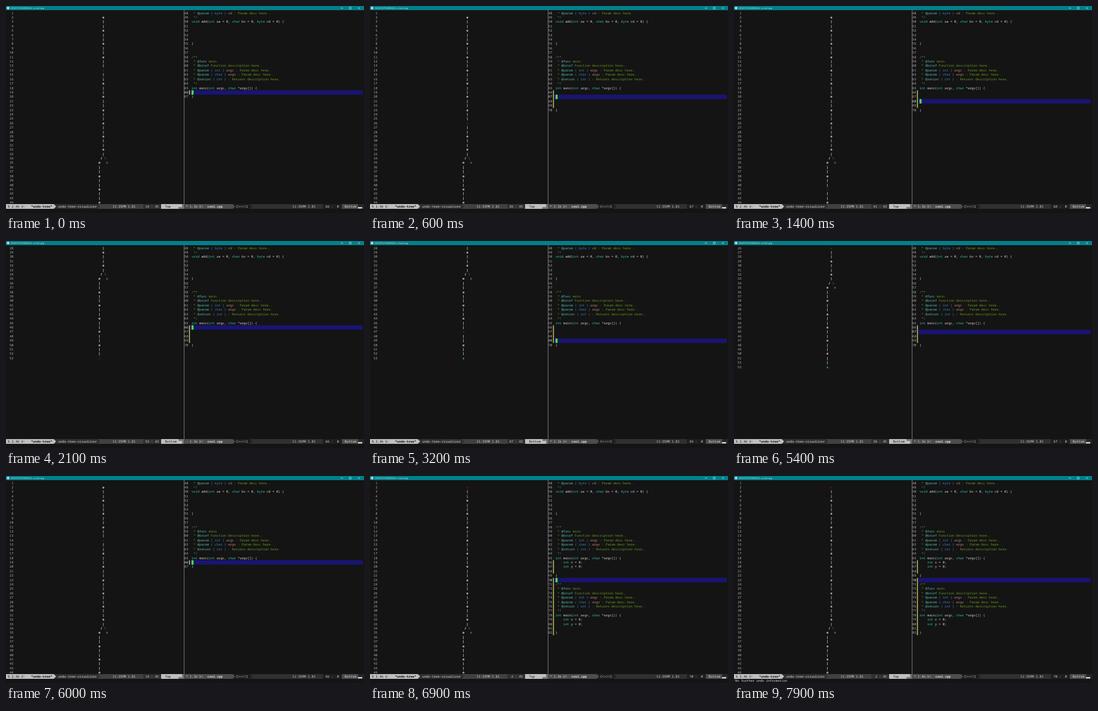
An HTML page with a canvas that plays this animation: 600 px wide and 348 px high, repeating every 8 s.

```html
<!DOCTYPE html>
<html lang="en">
<head>
<meta charset="utf-8">
<title>Undo tree</title>
<style>
html, body { margin: 0; width: 100%; height: 100%; overflow: hidden; background: #141414; }
canvas { display: block; }
</style>
</head>
<body>
<canvas id="stage" width="600" height="348"></canvas>
<script>
const ctx = document.getElementById('stage').getContext('2d');
const LOOP = 8000, CHAR = 3.227, ROW = 7.41, ROWS = 44, LAST = 53;
const MONO = '5.38px "Noto Sans Mono", "DejaVu Sans Mono", monospace';
const PLAIN = '#d8d8d8', TYPE = '#35c5b4', COMMENT = '#6c9a1e';

// Walk through the history: 13 steps down, then 17 up.
const times = [0, 100, 300, 400, 600, 700, 900, 1000, 1200, 1400, 1600, 1800, 1900, 2100,
  2900, 3200, 3600, 3800, 4200, 4300, 4500, 5100, 5300, 5500, 5600, 5800, 5900, 6100, 6300, 6500, 6700];
const cursorOffsets = '0123122312132023131232132101134';

const doc = ['/**', ' * @func main', ' * @brief Function description here..',
  ' * @param { int } argc : Param desc here..', ' * @param { char } argv : Param desc here..',
  ' * @return { int } : Returns description here..', ' */', 'int main(int argc, char *argv[]) {'];
const head = [' * @param { byte } cd : Param desc here..', ' */',
  'void add(int aa = 0, char bv = 0, byte cd = 0) {', '', '', '', '', '}', '', '', ...doc];
const vars = ['    int x = 0;', '    int y = 0;', ''];

function bodyFor(node) {
  if (node < 2) return vars;
  if (node === 2) return [vars[0], ''];
  return Array(node === 3 ? 2 : Math.min(4, node - 3)).fill('');
}

const rowY = i => 12 + ROW * i;

function rect(x, y, w, h, color) {
  ctx.fillStyle = color;
  ctx.fillRect(x, y, w, h);
}

function text(str, x, y, color = PLAIN, bold = false) {
  ctx.font = (bold ? 'bold ' : '') + MONO;
  ctx.fillStyle = color;
  [...str].forEach((c, i) => c !== ' ' && ctx.fillText(c, x + i * CHAR, y));
}

function codeLine(line, x, y) {
  const comment = /^( \*|\/\*)/.test(line);
  text(line, x, y, comment ? COMMENT : PLAIN);
  const rules = comment
    ? [[/@\w+/g, '#58b8a8'], [/\{ \w+ \}/g, '#3f80bd'], [/(?<=\} )\w+/g, '#c08a78']]
    : [[/\b(int|void|char|byte)\b/g, TYPE]];
  for (const [pattern, color] of rules) {
    for (const m of line.matchAll(pattern)) {
      rect(x + m.index * CHAR, y - 3.6, m[0].length * CHAR, 7.2, '#141414');
      text(m[0], x + m.index * CHAR, y, color);
    }
  }
}

function titleBar() {
  rect(0, 0, 600, 7, '#00808a');
  ctx.fillStyle = '#d8cfe6';
  ctx.beginPath();
  ctx.arc(3.5, 3.4, 2.2, 0, 7);
  ctx.fill();
  ctx.font = '3.9px "Open Sans", sans-serif';
  ctx.fillStyle = '#d5eef0';
  ctx.fillText('DESKTOP-8KRW263: s/cool.cpp', 8, 3.6);
  rect(561, 3.2, 4, .7, '#d5eef0');
  ctx.strokeStyle = '#d5eef0';
  ctx.lineWidth = .6;
  ctx.strokeRect(575.5, 2, 3, 3);
  ctx.beginPath();
  ctx.moveTo(590, 2); ctx.lineTo(593, 5);
  ctx.moveTo(593, 2); ctx.lineTo(590, 5);
  ctx.stroke();
}

function treePane(current, top) {
  for (let row = top, i = 0; row <= LAST && i < ROWS; row++, i++) {
    const y = rowY(i), put = (c, col, color, bold) => text(c, 16.2 + col * CHAR, y, color, bold);
    text(String(row).padStart(2), 6, y, '#b4b4b4');
    if (row === 1) continue;
    if (row === 34) {
      put('/', 44, '#fff', true);
      put('\\', 46, '#999');
      continue;
    }
    if (row === 35) put('o', 47, '#aaa');
    const col = row < 34 ? 45 : 43;
    const saved = row === LAST;
    if (row === current) put(saved ? 's' : 'x', col, '#b01515');
    else if (saved) put('s', col, '#20c8c0', true);
    else put(row % 3 === 2 ? 'o' : '|', col, '#f4f4f4', true);
  }
}

function codePane(node, cursor, cursorOn) {
  const body = bodyFor(node);
  const lines = [...head, ...body, '}'];
  const end = lines.length;
  if (node === 0) lines.push('', ...doc, ...vars, '}');
  rect(298, 7, 1, 326, '#777');
  lines.forEach((line, i) => {
    const y = rowY(i), n = 48 + i;
    const changed = i >= head.length && i !== end - 1;
    text(String(n), 299, y, n === cursor ? '#eee' : '#b4b4b4');
    if (changed) rect(306.7, y - 3.7, 1.5, ROW, '#c4c46a');
    if (n === cursor) {
      rect(309, y - 3.7, 289, ROW, '#191473');
      if (cursorOn) rect(311, y - 3.7, 3.3, ROW, '#48ee48');
    }
    codeLine(line, 311, y);
  });
}

function modeBar(x, edges, colors, labels) {
  edges.forEach((from, i) => {
    rect(x + from, 333, (edges[i + 1] ?? (x ? 302 : 298)) - from, 8, colors[i]);
    if (i === 1 || i === 2) {
      ctx.fillStyle = colors[i - 1];
      ctx.beginPath();
      ctx.moveTo(x + from, 333);
      ctx.lineTo(x + from + 4, 337);
      ctx.lineTo(x + from, 341);
      ctx.fill();
    }
  });
  for (const [str, dx, color, bold] of labels) text(str, x + dx, 337.3, color, bold);
}

function statusLine(row, top, node, cursor) {
  const place = top === 1 ? 'Top' : top === 4 ? '7%' : 'Bottom';
  const col = row < 34 ? 45 : 43;
  modeBar(0, [0, 80, 154, 230, 260, 289], ['#bfbfbf', '#303030', '#404040', '#303030', '#bfbfbf', '#777'], [
    ['% 2.4k U:', 3, '#111'], ['*undo-tree*', 42, '#111', true], ['undo-tree-visualizer', 87.5],
    ['11:35PM 1.81', 178.5], [String(row).padStart(2) + ' : ' + col, 233.5], [place, 266.5, '#111']]);
  rect(289, top === 1 ? 333 : 336, 6, 5, '#bfbfbf');
  const size = ['1.4k', '1.2k'][node] || '1.1k';
  modeBar(298, [0, 82, 111, 233, 265, 292], ['#4d4d4d', '#1f1f1f', '#303030', '#1f1f1f', '#4d4d4d', '#262626'], [
    [(node === 17 ? '-' : '*') + ' ' + size + ' U\\', 3.5], ['cool.cpp', 39.5, PLAIN, true], ['C++//l', 88],
    ['11:35PM 1.81', 182], [cursor + ' :  0', 237.5], ['Bottom', 269.5]]);
  rect(590, 338, 7, 2.5, '#d0d0d0');
}

function draw() {
  const t = performance.now() % LOOP;
  const step = times.findLastIndex(at => at <= t);
  const node = step <= 13 ? 4 + step : 30 - step;
  const row = 2 + 3 * node;
  const cursor = 66 + Number(cursorOffsets[step]);
  const top = step < 11 || step > 22 ? 1 : step === 11 ? 4 : step === 22 ? 26 : 28;
  const cursorOn = !(t >= 5400 && t < 5500) && t < 7800;

  rect(0, 0, 600, 348, '#141414');
  ctx.textBaseline = 'alphabetic';
  ctx.save();
  ctx.textBaseline = 'middle';
  ctx.textRendering = 'geometricPrecision';
  treePane(row, top);
  codePane(node, cursor, cursorOn);
  statusLine(row, top, node, cursor);
  titleBar();
  if (t >= 2300 && t < 2900) text('No further redo information', 2, 344.8);
  if (t >= 7100) text('No further undo information', 2, 344.8);
  ctx.restore();
  requestAnimationFrame(draw);
}
draw();
</script>
</body>
</html>
```
